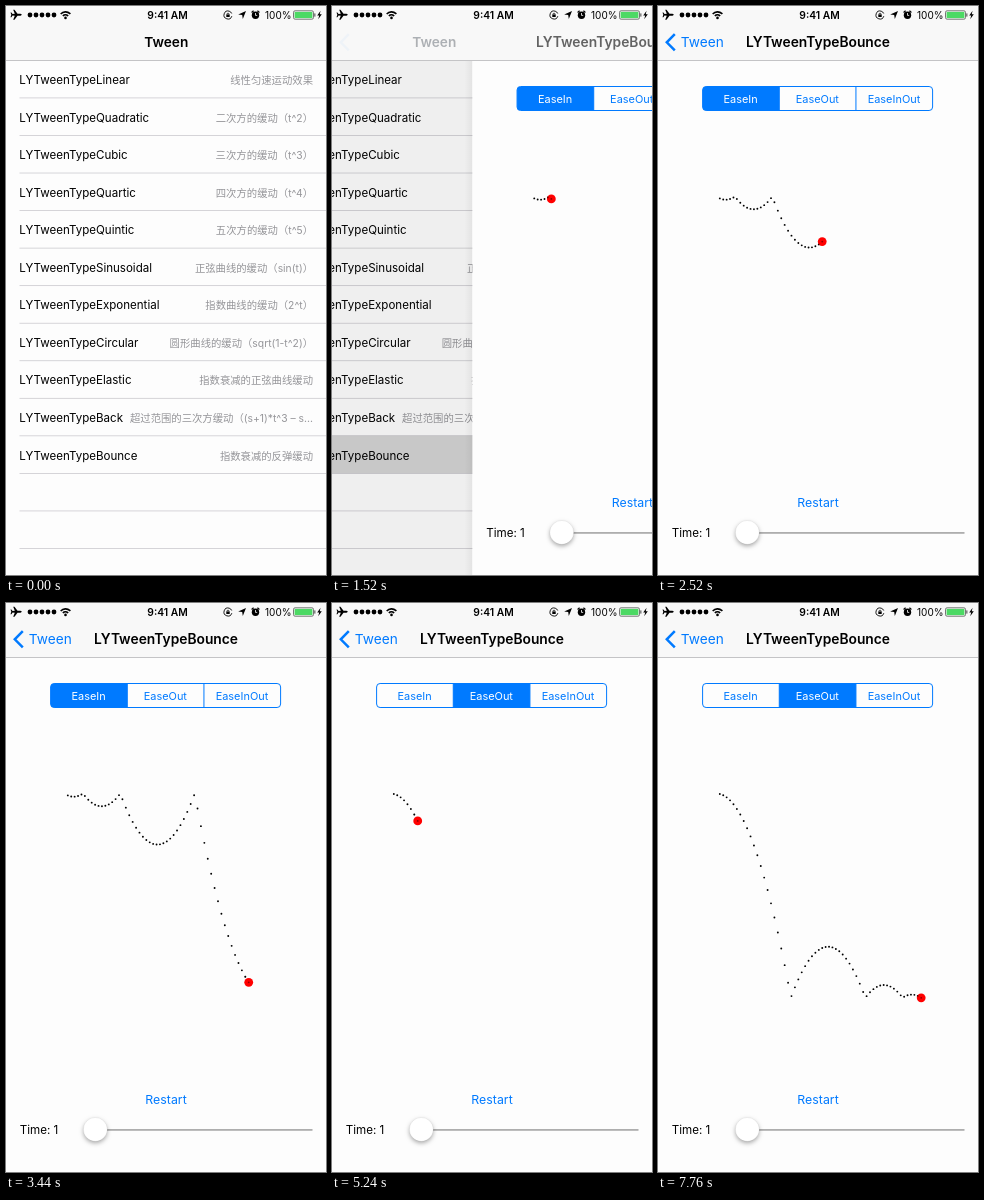
An HTML page with a canvas for the animation above (8 s loop, 320 by 569 pixels).

```html
<!DOCTYPE html>
<html lang="zh-CN">
<head>
<meta charset="utf-8">
<title>Tween</title>
<style>
html, body { margin: 0; width: 100%; height: 100%; overflow: hidden; background: #fdfdfd; }
canvas { display: block; width: 320px; height: 569px; }
</style>
</head>
<body>
<canvas id="stage"></canvas>
<script>
const W = 320, H = 569, LOOP = 8000, TICK = 40;
const TAP = 1120, PUSH = 1320, PRESS = 4680, SWITCH = 4880, OUT_START = 4960;
const BLUE = '#007aff', PAPER = '#fdfdfd', BAR = '#f8f8f8';
const NAV_H = 54.6, ROW_H = 37.547;
const FONT = 'Inter, "Noto Sans CJK SC", "Noto Sans CJK", sans-serif';

const ROWS = [
  ['Linear', '线性匀速运动效果'],
  ['Quadratic', '二次方的缓动（t^2）'],
  ['Cubic', '三次方的缓动（t^3）'],
  ['Quartic', '四次方的缓动（t^4）'],
  ['Quintic', '五次方的缓动（t^5）'],
  ['Sinusoidal', '正弦曲线的缓动（sin(t)）'],
  ['Exponential', '指数曲线的缓动（2^t）'],
  ['Circular', '圆形曲线的缓动（sqrt(1-t^2)）'],
  ['Elastic', '指数衰减的正弦曲线缓动'],
  ['Back', '超过范围的三次方缓动（(s+1)*t^3 – s...'],
  ['Bounce', '指数衰减的反弹缓动']
];
const SEGMENTS = ['EaseIn', 'EaseOut', 'EaseInOut'];

const canvas = document.getElementById('stage');
const dpr = window.devicePixelRatio || 1;
canvas.width = W * dpr;
canvas.height = H * dpr;
const c = canvas.getContext('2d');

function text(str, x, y, size, color, align = 'left', weight = 400) {
  c.font = `${weight} ${size}px ${FONT}`;
  c.textAlign = align;
  c.fillStyle = color;
  c.fillText(str, x, y);
}

function rect(x, y, w, h, color) {
  c.fillStyle = color;
  c.fillRect(x, y, w, h);
}

function disc(x, y, r, color) {
  c.fillStyle = color;
  c.beginPath();
  c.arc(x, y, r, 0, Math.PI * 2);
  c.fill();
}

function trace(points, close) {
  c.beginPath();
  points.forEach(([x, y]) => c.lineTo(x, y));
  if (close) c.closePath();
}

function shape(points, color) {
  trace(points, true);
  c.fillStyle = color;
  c.fill();
}

function stroke(color, width) {
  c.strokeStyle = color;
  c.lineWidth = width;
  c.stroke();
}

function ring(x, y, r, width, from = 0, to = Math.PI * 2) {
  c.beginPath();
  c.arc(x, y, r, from, to);
  stroke('#000', width);
}

const clamp = v => Math.max(0, Math.min(1, v));

// Remaining distance (1 to 0) of a critically damped spring.
function spring(t, start, rate) {
  const a = Math.max(0, t - start) * rate;
  const left = (1 + a) * Math.exp(-a);
  return left < 0.001 ? 0 : left;
}

function bounceOut(t) {
  const k = 7.5625, d = 2.75;
  if (t < 1 / d) return k * t * t;
  if (t < 2 / d) return k * (t - 1.5 / d) ** 2 + 0.75;
  if (t < 2.5 / d) return k * (t - 2.25 / d) ** 2 + 0.9375;
  return k * (t - 2.625 / d) ** 2 + 0.984375;
}
const bounceIn = t => 1 - bounceOut(1 - t);

function statusBar() {
  shape([[16, 8.8], [14.5, 7.8], [11.5, 7.8], [8.5, 3.8], [7.2, 3.8], [8.8, 7.8], [6.6, 8],
    [5.4, 6.4], [4.5, 6.4], [5.3, 8.8], [4.5, 11.2], [5.4, 11.2], [6.6, 9.6], [8.8, 9.8],
    [7.2, 13.8], [8.5, 13.8], [11.5, 9.8], [14.5, 9.8]], '#000');
  for (let i = 0; i < 5; i++) disc(24 + i * 6, 9, 2.4, '#000');
  for (const r of [3.6, 6.6]) ring(59.5, 12.5, r, 1.6, -Math.PI * 0.76, -Math.PI * 0.24);
  disc(59.5, 11.9, 1.3, '#000');
  text('9:41 AM', 161.5, 12.7, 10.3, '#000', 'center', 600);

  ring(222, 9, 4, 0.9, 0.3, 5.9);
  rect(220.3, 8.4, 3.4, 2.6, '#000');
  ring(222, 8.3, 1.1, 0.7, Math.PI, 0);
  shape([[240, 5], [236.8, 13], [236.2, 9], [232.2, 8.4]], '#000');
  disc(249.5, 9.2, 3.7, '#000');
  trace([[249.5, 7], [249.5, 9.4], [251.2, 9.4]]);
  stroke('#fff', 0.8);
  trace([[245.6, 6.4], [247.6, 4.8]]);
  stroke('#000', 1.3);
  trace([[253.4, 6.4], [251.4, 4.8]]);
  stroke('#000', 1.3);

  text('100%', 259, 12.7, 10, '#000');
  c.beginPath();
  c.roundRect(287.5, 4.8, 20, 8.4, 1.6);
  stroke('#555', 0.8);
  rect(288.6, 5.9, 17.8, 6.2, '#4cd964');
  rect(308.3, 7.4, 1.1, 3.2, '#555');
  shape([[314.6, 4.8], [311.2, 9.6], [313.2, 9.6], [312.2, 13.2], [315.8, 8.2], [313.7, 8.2]], '#000');
}

function navBar(t) {
  rect(0, 0, W, NAV_H, BAR);
  rect(0, 54, W, 1, '#c4c4c6');
  const left = spring(t, PUSH + 8, 0.00875);
  const u = clamp((t - PUSH) / 1200);
  const labelX = 44.3 + left * 116;

  c.globalAlpha = clamp(1 - u * 4.3);
  text('Tween', labelX, 41, 13.7, '#000', 'center', 600);
  if (t >= PUSH) {
    c.globalAlpha = clamp((t - PUSH - 160) / 1000);
    text('Tween', labelX, 41, 13.7, BLUE, 'center');
    trace([[16.8, 28.2], [8.8, 36.3], [16.8, 44.4]]);
    stroke(BLUE, 2.5);
    c.globalAlpha = clamp(u * 3.6);
    text('LYTweenTypeBounce', 160 + left * 232, 41, 13.8, '#000', 'center', 600);
  }
  c.globalAlpha = 1;
  statusBar();
}

function list(t, shift) {
  c.save();
  c.translate(shift, 0);
  if (t >= TAP) rect(0, NAV_H + 10 * ROW_H - 0.6, W, ROW_H + 0.6, '#d4d4d4');
  for (let i = 1; i <= 13; i++) {
    rect(13.5, NAV_H + i * ROW_H - 0.6, W, 0.75, '#c8c7cc');
  }
  ROWS.forEach(([name, note], i) => {
    const y = 78.1 + i * ROW_H;
    text('LYTweenType' + name, 13.3, y, 11.55, '#000');
    text(note, 307, y, 10.35, '#959599', 'right');
  });
  c.restore();
}

function segmented(t) {
  const x = 44.6, y = 80.5, w = 230, h = 24, part = w / 3;
  const picked = t < SWITCH ? 0 : 1;
  c.save();
  c.beginPath();
  c.roundRect(x, y, w, h, 3.5);
  c.clip();
  rect(x + picked * part, y, part, h, BLUE);
  if (t >= PRESS && t < SWITCH) rect(x + part, y, part, h, '#d6eafc');
  for (const i of [1, 2]) rect(x + i * part - 0.5, y, 1, h, BLUE);
  c.restore();
  c.beginPath();
  c.roundRect(x, y, w, h, 3.5);
  stroke(BLUE, 1);
  SEGMENTS.forEach((label, i) => {
    text(label, x + (i + 0.5) * part - 0.3, 96.5, 10.95, i === picked ? '#fff' : BLUE, 'center');
  });
}

function curve(t) {
  const out = t >= SWITCH;
  const ease = out ? bounceOut : bounceIn;
  const step = Math.floor((t - (out ? OUT_START : PUSH)) / TICK) + 1;
  const last = Math.max(0, Math.min(60, step));
  const at = i => [58.4 + 204.8 * i / 60, 190.5 + 204.3 * ease(i / 60)];

  for (let i = 1; i <= last; i++) disc(...at(i), 0.95, '#000');
  const [x, y] = at(last);
  disc(x, y, 4.4, '#f00');
  c.globalAlpha = 0.45;
  for (let i = Math.max(1, last - 1); i <= last; i++) disc(...at(i), 0.9, '#000');
  c.globalAlpha = 1;
}

function slider() {
  text('Time: 1', 13.8, 530.7, 11.6, '#000');
  rect(89, 526, 217.5, 1.8, '#aeaeae');
  c.save();
  c.shadowColor = 'rgba(0,0,0,.32)';
  c.shadowBlur = 4 * dpr;
  c.shadowOffsetY = 2 * dpr;
  disc(89.3, 526.4, 11.9, '#fff');
  c.restore();
  c.beginPath();
  c.arc(89.3, 526.4, 11.9, 0, Math.PI * 2);
  stroke('rgba(0,0,0,.1)', 0.5);
}

function detail(t, shift) {
  c.save();
  c.translate(shift, 0);
  rect(0, NAV_H, W, H, PAPER);
  segmented(t);
  curve(t);
  text('Restart', 160, 501.2, 12.35, BLUE, 'center');
  slider();
  c.restore();
}

function edgeShadow(x) {
  const g = c.createLinearGradient(x - 8, 0, x, 0);
  g.addColorStop(0, 'rgba(0,0,0,0)');
  g.addColorStop(1, 'rgba(0,0,0,.05)');
  rect(x - 8, NAV_H, 8, H, g);
}

function draw(t) {
  c.setTransform(dpr, 0, 0, dpr, 0, 0);
  rect(0, 0, W, H, PAPER);
  const left = spring(t, PUSH - 46, 0.00765);
  if (t < PUSH) {
    list(t, 0);
  } else {
    const x = W * left;
    if (x > 0) {
      list(t, -96 * (1 - left));
      rect(0, 0, x, H, `rgba(0,0,0,${0.1 * (1 - left)})`);
      edgeShadow(x);
    }
    detail(t, x);
  }
  navBar(t);
}

function frame() {
  const t = performance.now() % LOOP;
  draw(Math.floor(t / TICK) * TICK);
  requestAnimationFrame(frame);
}
frame();
</script>
</body>
</html>
```
